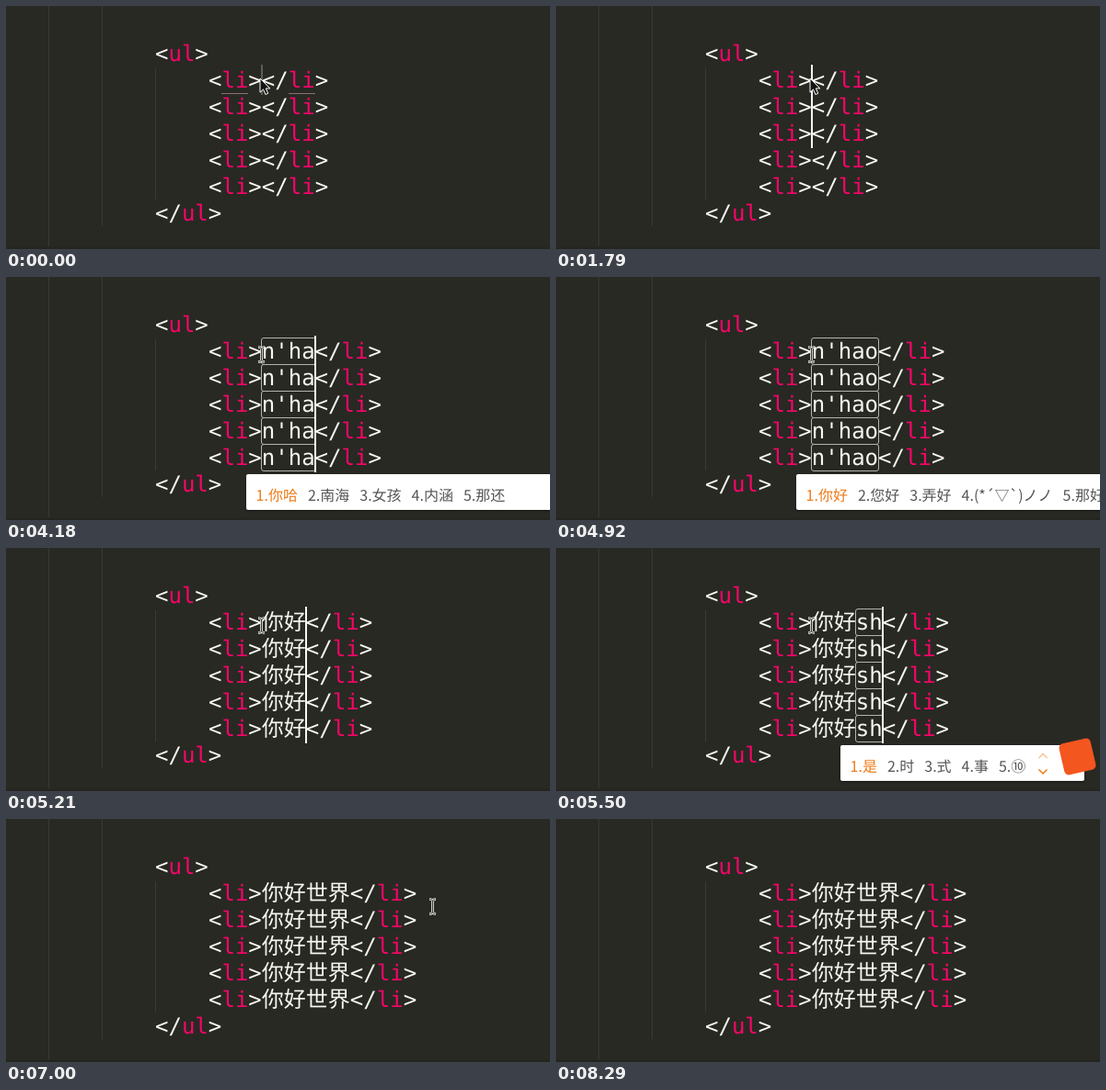
Recreate the animation shown at these times as an HTML page. Size 591x265 px, loop 8880 ms.

```html
<!DOCTYPE html>
<html lang="zh-CN">
<head>
<meta charset="utf-8">
<title>Multiple carets with an input method</title>
<style>
html, body { margin: 0; width: 100%; height: 100%; overflow: hidden; background: #282923; }
#stage { position: absolute; left: 0; top: 0; width: 591px; height: 265px; overflow: hidden; background: #282923; text-rendering: geometricPrecision; }
#stage > * { position: absolute; }
.guide { width: 1px; background: #393a34; }
.shade { left: 0; right: 0; bottom: 0; height: 3px; background: linear-gradient(#282923, #22231e); }
.row {
  height: 28px; white-space: pre; color: #f8f8f2;
  font: 24px/28px "DejaVu Sans Mono", "Noto Sans CJK SC", "Noto Sans CJK JP", monospace;
}
.row b { position: relative; font-weight: 400; color: #f80569; }
.mark b::after { content: ""; position: absolute; left: 0; right: 0; bottom: -1px; height: 1px; background: #8c6f75; }
.typed { position: relative; }
.typed:not(:empty)::after {
  content: ""; position: absolute; inset: -1px; box-sizing: border-box;
  border: 1px solid #b4b4ae; border-radius: 3px;
}
#caret { top: 64px; width: 2px; background: #f8f8f2; }
#ime { top: 215px; height: 39px; background: #fff; border-radius: 2px; box-shadow: 0 1px 3px rgba(0, 0, 0, .4); }
#words {
  position: absolute; left: 10.6px; top: 8px; display: flex; gap: 11px; white-space: pre; color: #555;
  font: 300 16px/28px "Noto Sans CJK SC", "Noto Sans CJK JP", "DejaVu Sans", sans-serif;
}
#words :first-child { color: #ee7a16; }
.arrows { position: absolute; right: 39px; top: 8px; fill: none; stroke: #ee7a16; stroke-width: 1.5; }
.badge { position: absolute; right: -10px; top: -5px; width: 35px; height: 35px; border-radius: 5px; background: #f4561f; transform: rotate(-13deg); }
#pointer { left: 0; top: 0; overflow: visible; }
</style>
</head>
<body>
<div id="stage">
  <div class="guide" style="left:46px;top:0;height:265px"></div>
  <div class="guide" style="left:104px;top:0;height:240px"></div>
  <div class="guide" style="left:162px;top:68px;height:143px"></div>
  <div class="shade"></div>
  <div id="caret"></div>
  <div id="ime">
    <div id="words"></div>
    <svg class="arrows" width="12" height="24">
      <path d="M1.5 6 6 1.5 10.5 6" opacity=".45"/>
      <path d="M1.5 18.5 6 23 10.5 18.5"/>
    </svg>
    <div class="badge"></div>
  </div>
  <svg id="pointer" width="1" height="1">
    <path id="arrow" d="M0 0v15.2l3.5-3.3 2.4 5.6 2.8-1.2-2.4-5.4h4.6z" fill="#111" stroke="#fff"/>
    <g id="beam" fill="none">
      <path d="M-3.5-8Q0-8 0-5.5Q0-8 3.5-8M0-5.5V5.5M-3.5 8Q0 8 0 5.5Q0 8 3.5 8" stroke="#f4f4f0" stroke-width="2.6"/>
      <path d="M-3-8Q0-8 0-5.5Q0-8 3-8M0-5.5V5.5M-3 8Q0 8 0 5.5Q0 8 3 8" stroke="#222" stroke-width=".9"/>
    </g>
  </svg>
</div>
<script>
const LOOP = 8880, PITCH = 29, CELL = 14.45, HAN = 24;
const $ = id => document.getElementById(id);

function addRow(index, left, html) {
  const row = document.createElement("div");
  row.className = "row";
  row.style.cssText = `left:${left}px;top:${38 + PITCH * index}px`;
  row.innerHTML = html;
  $("stage").insertBefore(row, $("caret"));
  return row;
}

addRow(0, 162, "&lt;<b>ul</b>&gt;");
const items = [1, 2, 3, 4, 5].map(i => addRow(i, 220,
  '&lt;<b>li</b>&gt;<span class="done"></span><span class="typed"></span>&lt;/<b>li</b>&gt;'));
addRow(6, 162, "&lt;/<b>ul</b>&gt;");

// Each step overrides part of the state; the rest carries over.
const steps = [
  [0, { done: "", typed: "", words: "", rows: 1, glow: .25, mark: true, end: false, beam: false, x: 276, y: 79 }],
  [150, { glow: 1 }],
  [440, { glow: .5 }],
  [590, { glow: 0 }],
  [890, { glow: 1, rows: 2, mark: false }],
  [1340, { glow: .5 }],
  [1490, { glow: 1, rows: 3 }],
  [1940, { rows: 4 }],
  [2240, { rows: 5 }],
  [2540, { glow: .5 }],
  [2690, { glow: 0 }],
  [2840, { glow: 1 }],
  [3140, { typed: "n", words: "你 能 年 您 ⚨" }],
  [3440, { glow: .5, beam: true, x: 277.5, y: 84.5 }],
  [3590, { glow: 0 }],
  [3730, { glow: 1 }],
  [4030, { typed: "n'h", words: "你好 女孩 年后 南海 那会" }],
  [4180, { typed: "n'ha", words: "你哈 南海 女孩 内涵 那还" }],
  [4320, { typed: "n'hao", words: "你好 您好 弄好 (*´▽`)ノノ 那好" }],
  [4770, { glow: .5 }],
  [4920, { glow: 0 }],
  [5210, { glow: 1, done: "你好", typed: "", words: "" }],
  [5360, { typed: "s", words: "是 说 上 所 三" }],
  [5500, { typed: "sh", words: "是 时 式 事 ⑩" }],
  [5650, { typed: "shi'j", words: "时间 世界 实际 事件 时机" }],
  [5800, { typed: "shi'jie", words: "世界 视界 使节 时节 师姐" }],
  [6250, { done: "你好世界", typed: "", words: "" }],
  [6550, { x: 318.5, y: 87.5 }],
  [6700, { glow: .5, x: 408.5, y: 92.5 }],
  [6850, { glow: 0, x: 455.5, y: 95.5 }],
  [7000, { x: 463.5 }],
  [7150, { glow: 1, end: true }],
  [7440, { x: 465.5, y: 99.5 }],
  [7590, { glow: .5, x: 477.5, y: 118.5 }],
  [7740, { glow: 0, x: 500.5, y: 156.5 }],
  [7880, { x: 527.5, y: 203.5 }],
  [8030, { x: 548.5, y: 240.5 }],
  [8160, { x: 558.5, y: 260.5 }],
  [8290, { x: 566.5, y: 290.5 }]
];
let carry = {};
const states = steps.map(([at, change]) => (carry = { ...carry, ...change, at }));

function draw(s) {
  for (const row of items) {
    row.querySelector(".done").textContent = s.done;
    row.querySelector(".typed").textContent = s.typed;
  }
  items[0].classList.toggle("mark", s.mark);

  const start = 277 + HAN * s.done.length;
  const caret = $("caret").style;
  caret.left = start + CELL * (s.typed.length + (s.end ? 5 : 0)) + "px";
  caret.height = PITCH * s.rows + 4 + "px";
  caret.opacity = s.glow;

  const words = s.words.split(" "), ime = $("ime").style;
  ime.display = s.words ? "block" : "none";
  ime.left = start - 16 + "px";
  ime.width = (words[0].length > 1 ? 400 : 265) + "px";
  $("words").innerHTML = words.map((w, i) => `<span>${i + 1}.${w}</span>`).join("");

  $("arrow").style.display = s.beam ? "none" : "";
  $("beam").style.display = s.beam ? "" : "none";
  $("pointer").style.transform = `translate(${s.x}px, ${s.y}px)`;
}

const origin = performance.now();
let shown;
function tick() {
  const t = (performance.now() - origin) % LOOP;
  const state = states.findLast(s => s.at <= t) || states[0];
  if (state !== shown) draw(shown = state);
  requestAnimationFrame(tick);
}
tick();
</script>
</body>
</html>
```
